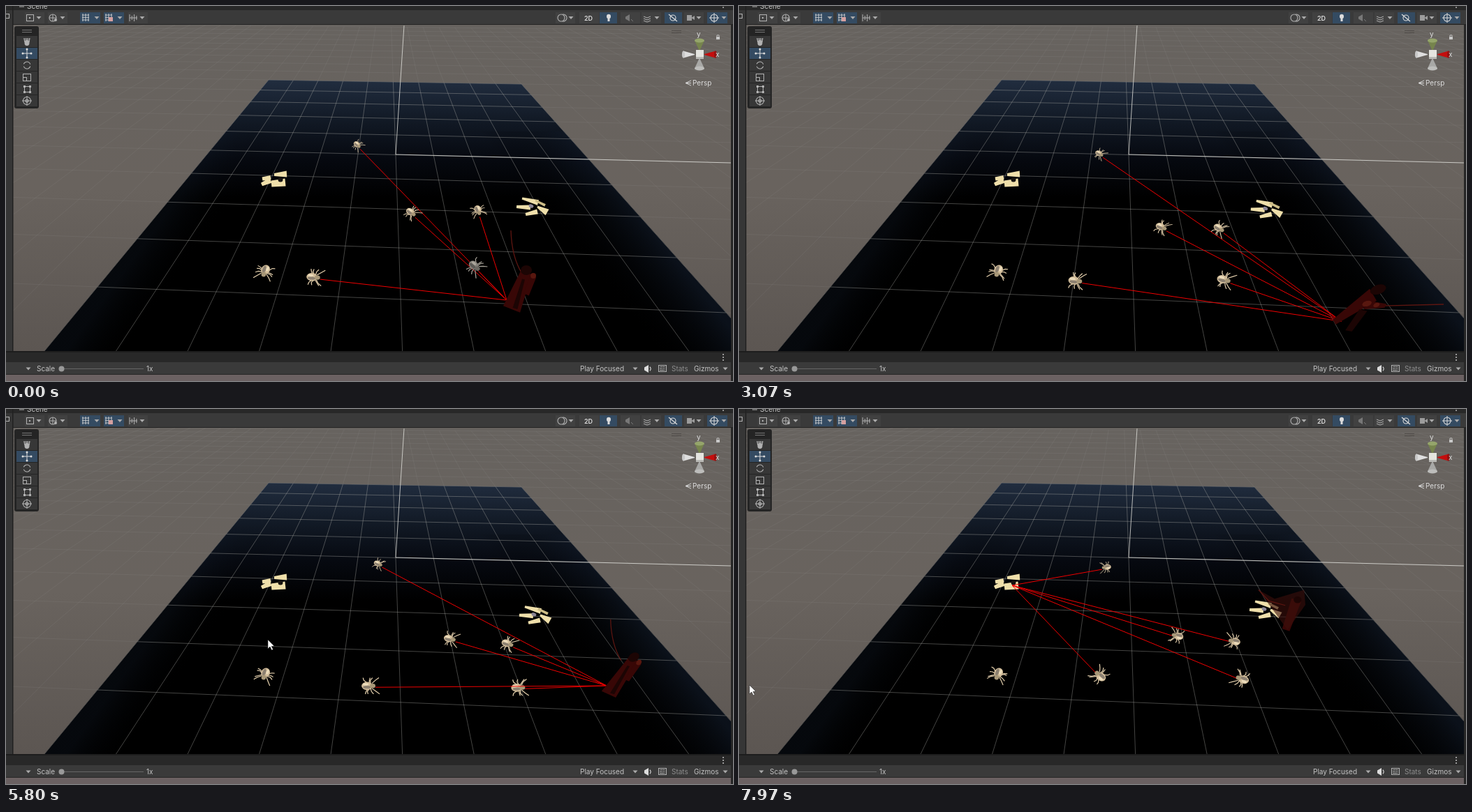
These frames come from a looping animation (1041 px wide and 538 px high, 8 s). An HTML page with a canvas:

```html
<!DOCTYPE html>
<html>
<head>
<meta charset="utf-8">
<style>
html, body { margin: 0; width: 100%; height: 100%; overflow: hidden; background: #282828; }
canvas { display: block; }
</style>
</head>
<body>
<canvas id="stage" width="1041" height="538"></canvas>
<script>
const W = 1041, H = 538, LOOP = 8000, STEP = 70;
const HORIZON = -102;
const stage = document.getElementById('stage').getContext('2d');
const backdrop = document.createElement('canvas');
backdrop.width = W;
backdrop.height = H;
let c = backdrop.getContext('2d');

// Drawing helpers
function trace(points) {
  c.beginPath();
  points.forEach(([x, y], i) => i ? c.lineTo(x, y) : c.moveTo(x, y));
}
function poly(points, color) {
  trace(points);
  c.closePath();
  c.fillStyle = color;
  c.fill();
}
function line(points, color, width = 1) {
  trace(points);
  c.strokeStyle = color;
  c.lineWidth = width;
  c.stroke();
}
const hline = (x, y, w, color, width) => line([[x, y], [x + w, y]], color, width);
const vline = (x, y, h, color, width) => line([[x, y], [x, y + h]], color, width);
function cross(x, y, r, color) {
  hline(x - r, y, 2 * r, color);
  vline(x, y - r, 2 * r, color);
}
function rect(x, y, w, h, color) {
  c.fillStyle = color;
  c.fillRect(x, y, w, h);
}
function box(x, y, w, h, color) {
  c.strokeStyle = color;
  c.lineWidth = 1;
  c.strokeRect(x + .5, y + .5, w, h);
}
function oval(x, y, rx, ry, color, turn = 0) {
  c.beginPath();
  c.ellipse(x, y, rx, ry, turn, 0, 7);
  c.fillStyle = color;
  c.fill();
}
function ring(x, y, r, color, from = 0, to = 6.3) {
  c.beginPath();
  c.arc(x, y, r, from, to);
  c.strokeStyle = color;
  c.lineWidth = 1.1;
  c.stroke();
}
// A tapered bar between two points.
function limb(x0, y0, x1, y1, w0, w1, color) {
  const len = Math.hypot(x1 - x0, y1 - y0), nx = (y0 - y1) / len / 2, ny = (x1 - x0) / len / 2;
  poly([[x0 + nx * w0, y0 + ny * w0], [x1 + nx * w1, y1 + ny * w1],
    [x1 - nx * w1, y1 - ny * w1], [x0 - nx * w0, y0 - ny * w0]], color);
}
function label(text, x, y, color = '#c4c4c4', size = 10, weight = 400) {
  c.font = `${weight} ${size}px Inter, sans-serif`;
  c.fillStyle = color;
  c.fillText(text, x, y);
}
const arrow = (x, y) => poly([[x - 3.5, y - 2], [x + 3.5, y - 2], [x, y + 2]], '#aaa');
function blend(x0, y0, x1, y1, ...colors) {
  const g = c.createLinearGradient(x0, y0, x1, y1);
  colors.forEach((color, i) => g.addColorStop(i / (colors.length - 1), color));
  return g;
}

// Ground perspective: columns 0..10 and rows 0..9 between four screen corners.
const { ground, locate } = (() => {
  const [a, b, d, e] = [[376, 106], [738, 112], [1031, 440], [131, 403]];
  const sub = (p, q) => [p[0] - q[0], p[1] - q[1]];
  const det = (p, q) => p[0] * q[1] - p[1] * q[0];
  const d1 = sub(b, d), d2 = sub(e, d), s = sub(sub(a, b), d2.map(v => -v));
  s[0] += 0; s[1] += 0;
  const sum = [a[0] - b[0] + d[0] - e[0], a[1] - b[1] + d[1] - e[1]];
  const g = det(sum, d2) / det(d1, d2), h = det(d1, sum) / det(d1, d2);
  const mu = [0, 1].map(k => b[k] - a[k] + g * b[k]);
  const mv = [0, 1].map(k => e[k] - a[k] + h * e[k]);
  return {
    ground(col, row) {
      const u = col / 10, v = row / 9, w = 1 + g * u + h * v;
      return [0, 1].map(k => (a[k] + u * mu[k] + v * mv[k]) / w);
    },
    locate(p) {
      const pu = mu.map((m, k) => m - g * p[k]), pv = mv.map((m, k) => m - h * p[k]), off = sub(p, a);
      return [10 * det(off, pv) / det(pu, pv), 9 * det(pu, off) / det(pu, pv)];
    }
  };
})();

function gridLines(c0, c1, r0, r1, color) {
  for (let i = c0; i <= c1; i++) line([ground(i, r0), ground(i, r1)], color, .9);
  for (let j = r0; j <= r1; j++) line([ground(c0, j), ground(c1, j)], color, .9);
}

function drawWorld() {
  c.save();
  c.beginPath();
  c.rect(10, 27, 1028, 468);
  c.clip();
  rect(10, 27, 1028, 468, blend(0, 27, 0, 495, '#67635f', '#69635e', '#5c5652'));
  gridLines(-22, 32, -9, 11, 'rgba(165,165,165,.13)');

  trace([ground(0, 0), ground(10, 0), ground(10, 10), ground(0, 10)]);
  c.closePath();
  c.clip();
  rect(10, 27, 1028, 468, blend(0, 106, 0, 275, '#212d3f', '#121a26', '#060910', '#000'));
  rect(10, 180, 1028, 315, blend(235, 290, 290, 330, 'rgba(16,24,36,.35)', 'transparent'));
  rect(10, 180, 1028, 315, blend(900, 293, 820, 358, 'rgba(17,26,40,.65)', 'transparent'));
  gridLines(0, 10, 0, 10, 'rgba(165,165,160,.46)');
  c.restore();

  line([[570, 28], [558, 213]], 'rgba(225,225,220,.8)');
  line([[558, 213], [1038, 225]], 'rgba(225,225,220,.8)');
}

const ink = '#b2b2b2', bright = '#dcdcdc';

function drawToolbar() {
  rect(0, 0, W, 6, '#282828');
  rect(10, 6, W - 10, 21, '#3a3a3a');
  rect(10, 26, W - 10, 1, '#232323');
  rect(0, 6, 9, 489, '#363636');
  rect(9, 0, 1.5, 495, '#202020');
  rect(1038, 27, 3, 468, '#262626');
  label('Scene', 30, 3.5);
  hline(19, 1, 7, ink);
  box(-3, 11, 7, 6, ink);
  oval(1027, 2, 1, 1, ink);

  const buttons = (color, width, ...xs) => xs.forEach(x => rect(x, 9, width, 16, color));
  buttons('#414141', 28, 27, 60, 175, 787, 821, 880, 910, 971);
  buttons('#344b62', 29, 106, 140, 1004);
  buttons('#344b62', 25, 850, 943);
  for (const x of [47, 81, 130, 163, 195, 809, 932, 992, 1028]) arrow(x, 17);

  box(29, 12, 10, 9, ink);
  oval(34, 17, 1.2, 1.2, ink);
  ring(67, 17, 5, ink);
  cross(67, 17, 5, ink);
  oval(71, 20, 2, 2, ink);
  for (const x of [110, 143]) {
    for (let i = 0; i < 3; i++) {
      vline(x + i * 4, 11, 11, bright, .9);
      hline(x - 1, 13 + i * 3.5, 10, bright, .7);
    }
  }
  rect(147, 16, 6, 6, '#d5a0a0');
  for (let i = 0; i < 4; i++) vline(177 + i * 3.3, 12 + i % 2 * 2, 10 - i % 2 * 4, ink);
  hline(177, 17, 11, ink);

  ring(795, 17, 5, ink);
  ring(798, 17, 5, ink, -1.8, 1.8);
  label('2D', 828, 20.5, bright, 9, 600);
  oval(863, 15, 3, 3.3, bright);
  rect(861.5, 18, 3, 4, bright);
  limb(887, 17, 893, 17, 3, 10, '#777');
  line([[895, 19], [898, 22]], '#777');
  for (let i = 0; i < 3; i++) line([[913, 15 + i * 3], [918, 17 + i * 3], [923, 15 + i * 3]], ink);
  ring(955, 17, 4, bright);
  line([[949, 12], [961, 22]], bright, 1.3);
  rect(975, 13, 7, 8, '#9c9c9c');
  limb(982, 17, 986, 17, 1, 6, '#9c9c9c');
  ring(1014, 17, 5, bright);
  cross(1014, 17, 7, bright);
}

function drawTools() {
  c.beginPath();
  c.roundRect(12, 29, 35, 118, 3);
  c.fillStyle = '#242424';
  c.fill();
  hline(23, 34.5, 14, '#777');
  hline(23, 37.5, 14, '#777');
  for (let i = 0; i < 6; i++) rect(15, 43 + i * 17, 30, 16, i === 1 ? '#344b62' : '#373737');
  oval(30, 53, 3.5, 4, ink);
  for (let i = 0; i < 4; i++) line([[27 + i * 2, 52], [26 + i * 2.6, 46]], ink, 1.4);
  cross(30, 68, 6, bright);
  for (let i = 0; i < 4; i++) oval(30 + 6 * Math.cos(i * Math.PI / 2), 68 + 6 * Math.sin(i * Math.PI / 2), 1.5, 1.5, bright);
  ring(30, 85, 5, ink, .3, 2.8);
  ring(30, 85, 5, ink, 3.5, 6);
  box(24, 97, 11, 10, ink);
  box(24, 102, 5, 5, ink);
  box(26, 115, 8, 8, ink);
  for (const x of [25, 33]) for (const y of [114, 122]) rect(x, y, 3, 3, ink);
  ring(30, 136, 5.5, ink);
  ring(30, 136, 2, ink);
  cross(30, 136, 7, ink);
}

function drawCompass() {
  const arms = [['#c40d0d', '#8f1212'], ['#a8a8a6', '#bdbdbb'], ['#dedede', '#c8c8c8'], ['#76844d', '#95a56b']];
  arms.forEach(([side, cap], i) => {
    const angle = i * Math.PI / 2, dx = Math.cos(angle), dy = Math.sin(angle);
    const x = 993 + 23 * dx, y = 69.5 + 20 * dy, across = Math.abs(dx);
    limb(993 + 7 * dx, 69.5 + 6 * dy, x, y, 1, 10 + 4 * (1 - across), side);
    oval(x, y, 7 - 5 * across, 3 + 2 * across, cap);
  });
  rect(988, 63, 11, 13, '#e4e4df');
  rect(988, 73, 11, 3, '#b9b9b5');
  label('y', 989, 44, bright);
  label('x', 1016, 73, bright);
  line([[981, 107], [973, 110.5], [981, 114]], bright);
  hline(973, 110.5, 8, bright);
  label('Persp', 983, 114, bright);
  hline(953, 35.5, 14, '#4c4845');
  hline(953, 38.5, 14, '#4c4845');
  rect(1017, 44, 5, 4, '#c8c8c8');
  ring(1019.5, 43.5, 1.8, '#c8c8c8', 3.1, 6.3);
}

function drawFooter() {
  rect(0, 495, W, 16, '#282828');
  rect(0, 495, W, 2, '#1d1d1d');
  rect(0, 511, W, 18, '#3a3a3a');
  rect(0, 528, W, 1, '#252525');
  rect(0, 529, W, 9, '#6b6162');
  rect(1038, 495, 3, 43, '#262626');
  for (let i = 0; i < 3; i++) oval(1027, 500 + i * 4, 1, 1, '#c0c0c0');
  for (const x of [32, 901, 1030]) arrow(x, 520.5);
  label('Scale', 44, 524);
  hline(80, 520.5, 117, '#666');
  oval(79.5, 520.5, 4, 4, '#999');
  label('1x', 201, 524);
  label('Play Focused', 822, 524);
  label('Stats', 953, 524, '#8d8d8d');
  label('Gizmos', 985, 524);
  limb(914, 520.5, 920, 520.5, 4, 11, bright);
  ring(920, 520.5, 3.2, bright, -1, 1);
  box(934, 515, 11, 9, ink);
  for (let i = 0; i < 3; i++) {
    hline(936, 517.5 + i * 2.5, 8, ink);
    vline(937 + i * 3, 516, 7, '#3a3a3a', .7);
  }
}

// Motion: eased travel between a few stops, each [time, ...values].
function travel(stops, t) {
  const next = stops.findIndex(stop => stop[0] > t);
  if (next < 1) return stops.at(next).slice(1);
  const a = stops[next - 1], b = stops[next], k = (t - a[0]) / (b[0] - a[0]);
  return a.slice(1).map((v, i) => v + (b[i + 1] - v) * k * (2 - k));
}
const depth = y => (y - HORIZON) / 500;

const TURN = 6520, HOME = [391, 253];
const heroStops = [[0, 717, 422, 0], [2400, 717, 422, 0], [3400, 880, 456, .6], [4300, 880, 456, .6],
  [5030, 860, 397, .3], [5940, 860, 397, .3], [6700, 779, 317, 0]];
const poses = [[0, 'stand'], [200, 'strike'], [700, 'stand'], [1250, 'swing'], [1500, 'strike'],
  [4330, 'stand'], [7580, 'swing']];
const cursorStops = [[5660, 375, 331], [5800, 375, 331], [5880, 304, 332], [7550, 304, 332], [7760, 15, 396]];
const goalAt = t => t < TURN ? travel(heroStops, t) : HOME;

// Each bug walks the ground at one speed toward its goal and halts when near.
const SPEED = .163, REACH = .48;
const bugs = [[503, 199], [580, 296], [676, 293], [671, 373], [440, 389]].map(start => {
  let [col, row] = locate(start);
  const path = [];
  for (let t = 0; t <= LOOP; t += STEP) {
    path.push(ground(col, row));
    const [gc, gr] = locate(goalAt(t)), dist = Math.hypot(gc - col, gr - row);
    const pace = dist > REACH ? SPEED * STEP / 1000 / dist : 0;
    col += (gc - col) * pace;
    row += (gr - row) * pace;
  }
  return path;
});

function drawBug(x, y, heading, t, shade) {
  const size = depth(y);
  const leg = shade ? '#a7a298' : '#dfcba9';
  c.save();
  c.translate(x, y);
  c.scale(size, size * .9);
  c.rotate(heading);
  for (const side of [-1, 1]) {
    for (let i = 0; i < 4; i++) {
      const k = i - 1.5, step = Math.sin(t / 95 + i * 2.4 + side) * 2;
      line([[k * 2 + 2, side * 4], [k * 5 + 2 + step, side * 9], [k * 7 + 4 + step, side * 13]], leg, 1.3);
    }
  }
  oval(-2, 0, 8, 6.5, shade ? '#85827b' : '#d2bd9a');
  oval(-2, 2, 6, 2.5, shade ? '#5c5a56' : '#8c8070');
  oval(-4, -2.5, 4, 2, shade ? '#aaa69c' : '#ecdcbb');
  oval(6, 0, 4, 3.5, shade ? '#6b6963' : '#a89878');
  c.restore();
}

// Torn wing pieces around a centre.
const cream = '#efdfaa';
function drawPerch(x, y) {
  limb(x - 17, y - 1, x - 5, y - 3, 5, 6, cream);
  limb(x - 18, y + 7, x - 5, y + 1, 5, 8, cream);
  limb(x, y - 7, x + 18, y - 8, 4, 9, cream);
  limb(x - 4, y + 6, x + 16, y + 4, 9, 11, cream);
  oval(x + 9, y, 3.5, 3.5, '#17130f');
}
function drawFlyer(x, y) {
  limb(x - 15, y - 11, x + 8, y - 5, 3, 8, cream);
  limb(x - 23, y + 1, x - 3, y + 2, 4, 7, cream);
  limb(x - 10, y + 12, x + 7, y + 8, 4, 7, cream);
  limb(x + 7, y + 1, x + 21, y + 9, 3, 10, cream);
  limb(x + 4, y - 8, x + 18, y - 1, 3, 4, '#cdbd87');
  oval(x - 2, y, 3.5, 2.5, '#8a8494', .4);
}

const dark = '#1c0504', red = '#380706', warm = '#58170f', blade = '#5e1611';
const figures = {
  stand() {
    limb(7, 13, 28, -40, 26, 16, red);
    limb(12, 12, 24, -30, 7, 4, dark);
    limb(28, -8, 38, -34, 8, 9, red);
    oval(28, -43, 8, 7, dark);
    oval(38, -35, 4, 4, warm);
  },
  strike() {
    limb(-9, 1, 24, -36, 10, 24, red);
    limb(17, 13, 22, -15, 10, 12, dark);
    limb(22, -22, 49, -21, 12, 5, red);
    oval(27, -43, 10, 7, dark);
    oval(22, -24, 6, 4, warm);
    oval(36, -22, 4, 3, warm);
  },
  swing() {
    limb(5, 0, 24, -54, 14, 18, red);
    poly([[-44, -72], [-15, -56], [38, -72], [40, -45], [8, 0]], 'rgba(60,15,12,.6)');
    line([[-44, -72], [-25, -52], [4, -44]], blade, 1.4);
    oval(26, -54, 7, 6, dark);
  }
};

function drawHero([x, y, lean], pose, t) {
  const size = depth(y) * .955;
  c.save();
  c.translate(x, y);
  c.scale(size, size);
  c.lineWidth = 1.3;
  c.strokeStyle = blade;
  c.beginPath();
  if (pose === 'stand') {
    c.moveTo(22, -38);
    c.quadraticCurveTo(7, -62, 6, -100);
  } else if (pose === 'strike') {
    const drop = t < 700 ? 60 * Math.sin((t - 200) / 500 * Math.PI) : 0;
    c.moveTo(47 + lean * 20, -21);
    c.lineTo(113 + lean * 48, -23 + drop);
  }
  c.stroke();
  c.transform(1, 0, -lean, 1, 0, 0);
  figures[pose]();
  c.restore();
}

function drawCursor(t) {
  if (t < cursorStops[0][0]) return;
  const [x, y] = travel(cursorStops, t);
  const tip = [[0, 0], [0, 13], [3, 10], [5.5, 15], [7.5, 14], [5.2, 9.5], [9, 9]].map(([a, b]) => [x + a, y + b]);
  poly(tip, '#fff');
  line([...tip, tip[0]], '#222', .6);
}

function draw(now) {
  const tick = Math.floor((now % LOOP + 10) / STEP), t = Math.max(0, tick * STEP - 10);
  const goal = goalAt(t), bob = Math.cos(t / 4000 * 2 * Math.PI);
  c.drawImage(backdrop, 0, 0);
  drawPerch(384, 249);
  drawFlyer(756 - 2 * bob, 291 - 4 * bob);
  drawBug(371, 380, 1.9, t / 3, false);

  bugs.forEach((path, i) => {
    const [x, y] = path[tick];
    const angle = Math.atan2(goal[1] - y - 2, goal[0] - x), gap = 10 * depth(y);
    drawBug(x, y, angle, t + i * 200, i === 3 && t < 2800);
    line([[x + gap * Math.cos(angle), y + 2 + gap * Math.sin(angle)], goal], '#f00000');
  });

  drawHero(travel(heroStops, t), poses.findLast(([at]) => at <= t)[1], t);
  drawCursor(t);
}

drawWorld();
drawToolbar();
drawTools();
drawCompass();
drawFooter();
c = stage;

const begin = performance.now();
function loop() {
  draw(performance.now() - begin);
  requestAnimationFrame(loop);
}
loop();
</script>
</body>
</html>
```
